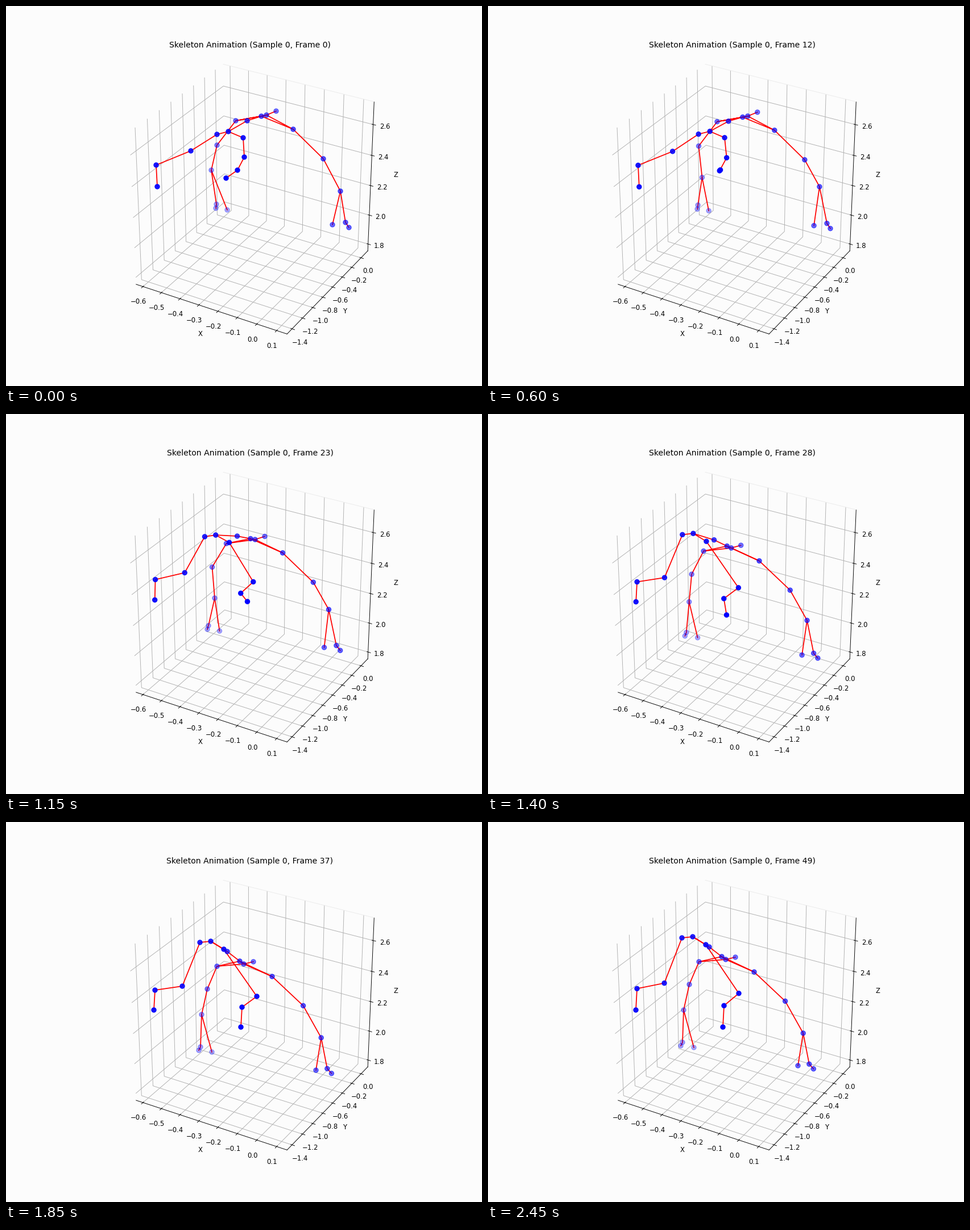
A matplotlib script for the animation above (2.5 s loop, 837 px wide and 669 px high).

```python
import matplotlib.pyplot as plt
import numpy as np
from matplotlib.animation import FuncAnimation

W, H, DPI = 837, 669, 83.7
FRAMES, INTERVAL = 50, 50
BG = "#fcfcfc"


def ease(frame, start, end):
    t = np.clip((frame - start) / (end - start), 0, 1)
    return t * t * (3 - 2 * t)


def spread(keys, count):
    """Spread a few values evenly along a chain of joints."""
    keys = np.array(keys, float).reshape(len(keys), -1)
    at = np.linspace(0, len(keys) - 1, count)
    return np.column_stack([np.interp(at, range(len(keys)), col) for col in keys.T])


class Part:
    """A chain of joints that drifts from its rest pose, with one joint swinging on the way."""

    def __init__(self, rest, drift, alpha, span=(9, 37), lift=(1,), swing=None):
        self.rest = np.array(rest, float)
        count = len(rest)
        self.drift = spread(drift, count)
        self.alpha = spread(alpha, count)[:, 0]
        self.lift = spread(lift, count) * (0, -8)
        self.span = span
        self.swing = np.zeros((count, 2))
        if swing:
            index, offset = swing
            self.swing[index] = offset

    def at(self, frame):
        swing = np.sin(np.pi * min(frame / 34, 1)) ** 2
        return (self.rest + self.drift * ease(frame, *self.span)
                + self.swing * swing + self.lift * ease(frame, 43, 49))


LEG = dict(span=(10, 30), lift=(1, 0))

base = Part([(391, 221)], [(-31, -11)], [.86], span=LEG["span"])
trunk = Part(  # mid, chest, neck, head
    [(424, 202), (449, 194), (458, 192), (475, 185)],
    [(-35, 26), (-38, 51), (-40, 58), (-40, 61)], (.74, .54))
# Arms: shoulder, elbow, wrist, hand, tip, thumb
arm_l = Part(
    [(404, 202), (371, 245), (361, 289), (370, 349), (369, 356), (389, 359)],
    [(-33, 52), (-17, 49), (-17, 50), (-28, 47), (-30, 46), (-27, 46)],
    (.56, .37, .33), swing=(2, (20, 14)))
arm_r = Part(
    [(505, 217), (558, 269), (588, 326), (597, 381), (603, 390), (574, 385)],
    [(-37, 55), (-29, 52)], (.68, .59), swing=(2, (-5, -12)))
# Legs: hip, knee, ankle, foot
leg_l = Part(
    [(371, 226), (325, 255), (264, 280), (266, 318)],
    [(-30, -14), (-15, 34), (-2, 16), (-6, 13)], (.86, .92), **LEG)
leg_r = Part(
    [(417, 232), (419, 266), (407, 289), (387, 303)],
    [(-34, -8), (22, 41), (8, 37), (26, 58)], (.9, 1), swing=(3, (26, -20)), **LEG)

PARTS = [base, trunk, arm_l, arm_r, leg_l, leg_r]


def bone_path(poses):
    root, body, *limbs = poses
    chest, neck = body[1], body[2]
    chains = [[*root, *body]]
    for arm in limbs[:2]:
        chains += [[chest, *arm[:5]], [neck, arm[0]], [arm[2], arm[5]]]
    for leg in limbs[2:]:
        chains.append([*root, *leg])
    gap = [(np.nan, np.nan)]
    return np.vstack([np.vstack([chain, gap]) for chain in chains]).T


fig = plt.figure(figsize=((W + .01) / DPI, (H + .01) / DPI), dpi=DPI, facecolor=BG)

ax = fig.add_subplot(projection="3d", facecolor=BG)
ax.set_box_aspect((1, 1, 1))
ax.set(xlim=(-.6377, .1521), ylim=(-1.4937, .149), zlim=(1.7526, 2.7448),
       xlabel="X", ylabel="Y", zlabel="Z")
for axis in (ax.xaxis, ax.yaxis, ax.zaxis):
    axis.set_pane_color((1, 1, 1, 0))
title = ax.set_title("")

# Flat layer in stage pixels for the figure
stage = fig.add_axes((0, 0, 1, 1))
stage.axis("off")
stage.set(xlim=(0, W), ylim=(H, 0))
stage.plot([382, 647], [102.5, 168.5], color="#ebebeb", lw=.8)
bones, = stage.plot([], [], color="red", lw=1.5)

# Far joints first, so that near ones cover them
alphas = np.concatenate([part.alpha for part in PARTS])
order = np.argsort(alphas)
colors = [(0, 0, 1, a) for a in alphas[order]]
dots = stage.scatter(*np.zeros((2, len(order))), s=50, c=colors, zorder=3)


def update(frame):
    poses = [part.at(frame) for part in PARTS]
    bones.set_data(*bone_path(poses))
    dots.set_offsets(np.vstack(poses)[order])
    title.set_text(f"Skeleton Animation (Sample 0, Frame {frame})")
    return bones, dots, title


anim = FuncAnimation(fig, update, frames=FRAMES, interval=INTERVAL, repeat=True)
plt.show()
```
